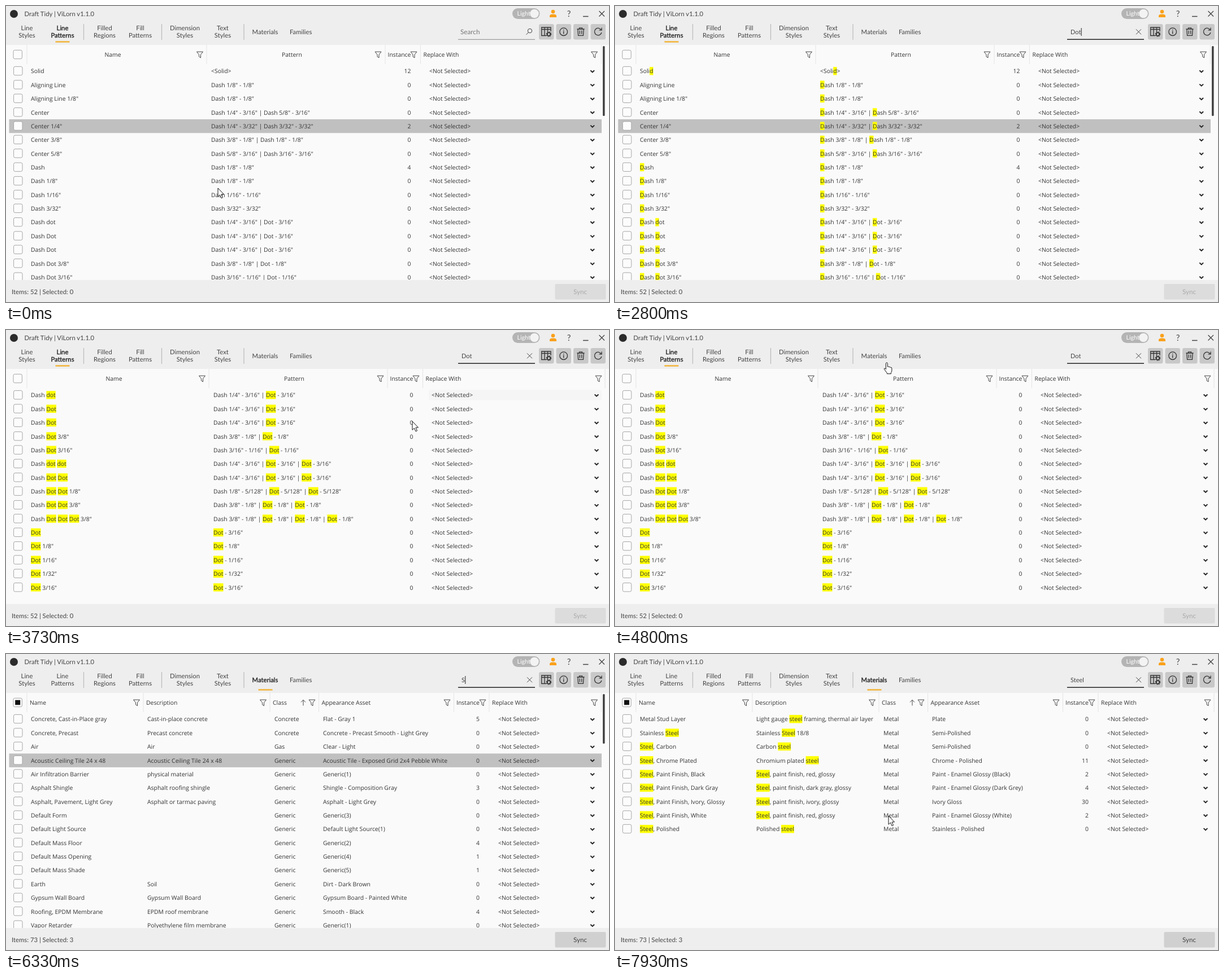
An HTML page for the animation above (8 s loop, 1067 by 525 pixels).

```html
<!DOCTYPE html>
<html lang="en">
<head>
<meta charset="utf-8">
<title>Table search</title>
<style>
  html, body { margin: 0; width: 100%; height: 100%; overflow: hidden; background: #fafafa; }
  svg { display: block; text-rendering: geometricPrecision; }
  text { fill: #333; font: 10.4px "Open Sans", "Noto Sans", sans-serif; }
  .ui text { fill: #444; font: 11.3px Lato, sans-serif; }
  .ui .on { fill: #1c1c1c; stroke: #1c1c1c; stroke-width: .3; }
  .ui .mid, .mid { text-anchor: middle; }
  .end { text-anchor: end; }
  .line { fill: none; stroke: #444; }
</style>
</head>
<body>
<svg id="stage" width="1067" height="525" viewBox="0 0 1067 525">
  <rect width="1067" height="525" fill="#fafafa"/>
  <g id="pages"></g>
  <g class="ui">
    <rect width="1067" height="69" fill="#eee"/>
    <rect y="486" width="1067" height="39" fill="#eee"/>
    <circle cx="14" cy="14" r="7" fill="#2b2b2b"/>
    <text x="32.5" y="17.5">Draft Tidy | ViLorn v1.1.0</text>

    <rect x="896" y="4" width="48.5" height="19" rx="9.5" fill="#b4b4b4"/>
    <text x="904.5" y="17.2" style="fill:#fff;font-size:10.7px">Light</text>
    <circle cx="935" cy="13.5" r="7.8" fill="#f3f3f3"/>
    <circle cx="968" cy="10" r="3.3" fill="#f9a11b"/>
    <path d="M962 20v-2.2q0-3.300 6-3.300t6 3.300V20z" fill="#f9a11b"/>
    <text class="mid" x="996" y="18.500" style="font-size:15px">?</text>
    <path class="line" stroke-width="1.300" d="M1021 18.500h9.500M1049.500 9l9.500 9.500m0-9.500l-9.500 9.500"/>

    <path d="M137.500 32v28M275.500 32v28M421 32v28" stroke="#bdbdbd" stroke-width="1.300"/>
    <g id="tabs"></g>
    <rect id="mark" y="62.300" width="25" height="2.400" fill="#f2b233"/>

    <text id="hint" x="804" y="50" style="font-size:11.700px;fill:#777">Search</text>
    <text id="typed" x="806" y="50" style="font-size:11px"></text>
    <rect id="caret" y="39" width="1" height="14" fill="#222"/>
    <path id="under" d="M800 59.300h136"/>
    <path id="lens" class="line" d="M924.500 46.800l-4 4M930.700 44a3.700 3.700 0 1 1-7.400 0a3.700 3.700 0 1 1 7.400 0z"/>
    <path id="clear" class="line" d="M922 41.300l9 9m0-9l-9 9"/>

    <g fill="#c8c8c8">
      <rect x="943" y="32" width="26.500" height="27.500" rx="3"/>
      <rect x="973.500" y="32" width="26.500" height="27.500" rx="3"/>
      <rect x="1004" y="32" width="26.500" height="27.500" rx="3"/>
      <rect x="1034.500" y="32" width="26.500" height="27.500" rx="3"/>
    </g>
    <g class="line" stroke-width="1.300" style="stroke:#333">
      <path d="M956 52.500h-8.300v-14.500h16.300v7M947.700 41.500h16.300M953 38v14.500M958.500 38v8"/>
      <circle cx="960.500" cy="50" r="2.800" stroke-width="1.800"/>
      <circle cx="960.500" cy="50" r="4.200" stroke-dasharray="1.650 1.650"/>
      <circle cx="986.700" cy="45.700" r="6.800"/>
      <path d="M986.700 44.500v5M986.700 41.800v1.400"/>
      <path d="M1010.500 41h13M1014.500 41v-2.200h5V41M1011.800 41l.8 11.300h8.800l.8-11.300M1015.300 43.500v6.300M1018.700 43.500v6.300"/>
      <path d="M1053.300 42.500a6.300 6.300 0 1 0 .6 4.500M1054 38.500v4.400h-4.400"/>
    </g>

    <text id="status" x="10" y="510.500"></text>
    <rect id="sync" x="971.500" y="493" width="90" height="27.500" rx="2"/>
    <text id="syncText" class="mid" x="1016" y="510.700" style="font-size:11.600px">Sync</text>
  </g>
  <g id="pointer" stroke="#111" fill="#fff" stroke-linejoin="round">
    <path id="arrow" d="M0 0V15.300L3.500 12 6 17.800 8.500 16.700 6 11H10.500Z"/>
    <path id="beam" fill="none" stroke-width="1.200" d="M-3-7h2q1 0 1 1V6q0 1-1 1h-2M3-7h-2q-1 0-1 1M3 7h-2q-1 0-1-1"/>
    <path id="hand" d="M-1.500 1.300a1.500 1.500 0 0 1 3 0V7q1.400-1 2.600.5q1.400-.8 2.400.6q2.500-.4 2.500 2V14q0 2-1.500 3.500V19.500H.5V18L-4.500 11.500q-.3-2.200 1.500-1.500L-1.500 11.500Z"/>
  </g>
</svg>
<script>
const $ = id => document.getElementById(id);
const LOOP = 8000, RATE = 15, TOP = 115.5, PITCH = 24.37;

function el(tag, attrs, parent, text) {
  const node = document.createElementNS('http://www.w3.org/2000/svg', tag);
  for (const k in attrs) node.setAttribute(k, attrs[k]);
  if (text !== undefined) node.textContent = text;
  parent.appendChild(node);
  return node;
}

// name; pattern; instances (0 when left out)
const lines = `Solid;<Solid>;12
Aligning Line;Dash 1/8 - 1/8
Aligning Line 1/8;Dash 1/8 - 1/8
Center;Dash 1/4 - 3/16 | Dash 5/8 - 3/16
Center 1/4;Dash 1/4 - 3/32 | Dash 3/32 - 3/32;2
Center 3/8;Dash 3/8 - 1/8 | Dash 1/8 - 1/8
Center 5/8;Dash 5/8 - 3/16 | Dash 3/16 - 3/16
Dash;Dash 1/8 - 1/8;4
Dash 1/8;Dash 1/8 - 1/8
Dash 1/16;Dash 1/16 - 1/16
Dash 3/32;Dash 3/32 - 3/32
Dash dot;Dash 1/4 - 3/16 | Dot - 3/16
Dash Dot;Dash 1/4 - 3/16 | Dot - 3/16
Dash Dot;Dash 1/4 - 3/16 | Dot - 3/16
Dash Dot 3/8;Dash 3/8 - 1/8 | Dot - 1/8
Dash Dot 3/16;Dash 3/16 - 1/16 | Dot - 1/16
Dash dot dot;Dash 1/4 - 3/16 | Dot - 3/16 | Dot - 3/16
Dash Dot Dot;Dash 1/4 - 3/16 | Dot - 3/16 | Dot - 3/16
Dash Dot Dot 1/8;Dash 1/8 - 5/128 | Dot - 5/128 | Dot - 5/128
Dash Dot Dot 3/8;Dash 3/8 - 1/8 | Dot - 1/8 | Dot - 1/8
Dash Dot Dot Dot 3/8;Dash 3/8 - 1/8 | Dot - 1/8 | Dot - 1/8 | Dot - 1/8
Dot;Dot - 3/16
Dot 1/8;Dot - 1/8
Dot 1/16;Dot - 1/16
Dot 1/32;Dot - 1/32
Dot 3/16;Dot - 3/16`.replace(/\d+\/\d+/g, '$&"').split('\n').map(r => r.split(';'));

// name; description; class; asset; instances
const materials = `Concrete, Cast-in-Place gray;Cast-in-place concrete;Concrete;Flat - Gray 1;5
Concrete, Precast;Precast concrete;Concrete;Concrete - Precast Smooth - Light Grey
Air;Air;Gas;Clear - Light
Acoustic Ceiling Tile 24 x 48;Acoustic Ceiling Tile 24 x 48;Generic;Acoustic Tile - Exposed Grid 2x4 Pebble White
Air Infiltration Barrier;physical material;Generic;Generic(1)
Asphalt Shingle;Asphalt roofing shingle;Generic;Shingle - Composition Gray;3
Asphalt, Pavement, Light Grey;Asphalt or tarmac paving;Generic;Asphalt - Light Grey
Default Form;;Generic;Generic(3)
Default Light Source;;Generic;Default Light Source(1)
Default Mass Floor;;Generic;Generic(2);4
Default Mass Opening;;Generic;Generic(4);1
Default Mass Shade;;Generic;Generic(5);1
Earth;Soil;Generic;Dirt - Dark Brown
Gypsum Wall Board;Gypsum Wall Board;Generic;Gypsum Board - Painted White
Roofing, EPDM Membrane;EPDM roof membrane;Generic;Smooth - Black;4
Vapor Retarder;Polyethylene film membrane;Generic;Generic(1)
Metal Stud Layer;Light gauge steel framing, thermal air layer;Metal;Plate
Stainless Steel;Stainless Steel 18/8;Metal;Semi-Polished
Steel, Carbon;Carbon steel;Metal;Semi-Polished
Steel, Chrome Plated;Chromium plated steel;Metal;Chrome - Polished;11
Steel, Paint Finish, Black;Steel, paint finish, red, glossy;Metal;Paint - Enamel Glossy (Black);2
Steel, Paint Finish, Dark Gray;Steel, paint finish, dark gray, glossy;Metal;Paint - Enamel Glossy (Dark Grey);4
Steel, Paint Finish, Ivory, Glossy;Steel, paint finish, ivory, glossy;Metal;Ivory Gloss;30
Steel, Paint Finish, White;Steel, paint finish, red, glossy;Metal;Paint - Enamel Glossy (White);2
Steel, Polished;Polished steel;Metal;Stainless - Polished`.split('\n').map(r => r.split(';'));

// column: left edge, title, title x, funnel x, cell x, centred title
const lineCols = s => [
  [37, 'Name', 189 + s / 2, 343 + s, 44, true],
  [355 + s, 'Pattern', 506 + s, 658.5 + s, 363 + s, true],
  [671 + s, 'Instance', 675.5 + s, 721.5 + s, 716.5 + s],
  [733.5 + s, 'Replace With', 738.5 + s, s ? 1048.5 : 1041, 749 + s]
];
const materialCols = s => [
  [37, 'Name', 42, 231, 44],
  [243, 'Description', 248, 455, 250],
  [467, 'Class', 472, 541.5, 475],
  [553.5, 'Appearance Asset', 558.5, 780.5, 561],
  [792.5, 'Instance', 797, 843.5, 838],
  [855, 'Replace With', 860, s ? 1048.5 : 1041, 871]
];

function checkBox(g, x, y) {
  el('rect', { x: x - 7.7, y: y - 7.7, width: 15.4, height: 15.4, rx: 2.5, fill: '#fcfcfc', stroke: '#a6a6a6' }, g);
}

function cell(g, x, y, text, query) {
  const node = el('text', { x, y: y + 3.9 }, g, text);
  if (!query) return;
  for (const m of text.matchAll(new RegExp(query, 'gi'))) {
    const a = node.getStartPositionOfChar(m.index).x;
    const b = node.getEndPositionOfChar(m.index + m[0].length - 1).x;
    const mark = el('rect', { x: a, y: y - 7.4, width: b - a, height: 14.4, fill: '#ff0' }, g);
    g.insertBefore(mark, node);
  }
}

function page({ cols, rows, query, picked = -1, bar = 0, some }) {
  const g = el('g', {}, $('pages'));
  const n = cols.length, right = bar ? 1053.5 : 1060;
  checkBox(g, 20.7, 86);
  if (some) el('rect', { x: 16.2, y: 81.7, width: 9, height: 8.6, fill: '#111' }, g);
  cols.forEach(([left, title, x, funnel, , centred]) => {
    el('path', { d: `M${left} 69v34`, stroke: '#e4e4e4' }, g);
    el('text', { x, y: 89.9, class: centred ? 'mid' : '' }, g, title);
    el('path', { class: 'line', d: `M${funnel - 5.5} 81.2h11l-4 5v5.600l-3-2v-3.600z` }, g);
    if (title === 'Class') el('path', { class: 'line', d: 'M526 91.500v-10m-4 4l4-4l4 4' }, g);
  });
  el('path', { d: `M${right} 69v34`, stroke: '#e4e4e4' }, g);
  if (bar) el('rect', { x: 1056, y: 71, width: 3.6, height: bar, rx: 1.5, fill: '#444' }, g);

  rows.forEach((row, i) => {
    const y = TOP + i * PITCH;
    if (i === picked) el('rect', { x: 5.5, y: y - 12.1, width: 1048.5, height: 24.4, fill: '#c0c0c0' }, g);
    checkBox(g, 21.3, y - .4);
    cols.forEach((c, k) => {
      if (k < n - 2) cell(g, c[4], y, row[k], query);
    });
    el('text', { x: cols[n - 2][4], y: y + 3.9, class: 'end' }, g, row[n - 2] || '0');
    cell(g, cols[n - 1][4], y, '<Not Selected>');
    el('path', { d: `M${bar ? 1034.3 : 1041.6} ${y - 1.3}l3.400 3.200l3.400-3.200`, fill: 'none', stroke: '#222', 'stroke-width': 1.9 }, g);
  });
  return g;
}

const has = word => row => row.join(' ').toLowerCase().includes(word);
const allLines = { cols: lineCols(0), rows: lines.slice(0, 16), picked: 4, bar: 124 };
const allMaterials = { cols: materialCols(0), rows: materials.slice(0, 16), picked: 3, bar: 88, some: true };

// start tick and content of each table state
const pages = [
  [0, allLines],
  [38, { ...allLines, query: 'd' }],
  [47, { cols: lineCols(4), rows: lines.filter(has('dot')), query: 'dot' }],
  [76, allMaterials],
  [102, { ...allMaterials, query: 's' }],
  [113, { cols: materialCols(1), rows: materials.filter(has('steel')), query: 'steel', some: true }]
].map(([at, spec]) => [at, page(spec)]);

const hover = el('rect', { x: 748, y: 106.5, width: 306, height: 18, rx: 2, fill: '#f5f5f5' }, $('pages'));
pages[2][1].prepend(hover);

const tabs = [['Line', 'Styles', 37], ['Line', 'Patterns', 100], ['Filled', 'Regions', 174.5], ['Fill', 'Patterns', 237.5],
  ['Dimension', 'Styles', 316.5], ['Text', 'Styles', 383.5], ['Materials', '', 458.5], ['Families', '', 521.7]
].map(([a, b, x]) => {
  const g = el('g', {}, $('tabs'));
  el('text', { x, y: b ? 43.2 : 49.8, class: 'mid' }, g, a);
  if (b) el('text', { x, y: 55.8, class: 'mid' }, g, b);
  return g;
});

// [tick, value] lists; the last entry reached counts
const typing = [[0, ''], [33, 'D'], [39, 'Do'], [42, 'Dot'], [76, ''], [95, 'S'], [102, 'St'], [104, 'Ste'], [106, 'Stee'], [108, 'Steel']];
const shapes = [[0, 'arrow'], [7, 'beam'], [32, ''], [52, 'beam'], [53, 'arrow'], [72, 'hand'], [79, 'arrow'], [85, 'beam'], [95, ''], [118, 'arrow']];
const blinks = [[0, 0], [15, 1], [23, 0], [31, 1], [50, 0], [58, 1], [66, 0], [74, 1], [76, 0], [88, 1], [116, 0]];
const path = [[0, 375, 323], [5, 862, 72], [6, 862, 72], [8, 854, 48], [9, 854, 48], [10, 852, 48],
  [51, 852, 48], [54, 782, 108], [56, 719, 162], [60, 644, 363], [64, 531, 151], [69, 488, 64], [71, 488, 64],
  [74, 466.500, 46.500], [77, 466.500, 46.500], [82, 640, 76], [86, 845, 53.500],
  [117, 845, 53.500], [118, 645, 263], [119, 484, 287], [120, 484, 287]];

const at = (list, n) => list.filter(k => k[0] <= n).pop()[1];

function along(n) {
  const i = Math.max(1, path.findIndex(k => k[0] >= n));
  const [a, x, y] = path[i - 1], [b, u, v] = path[i];
  const p = (n - a) / (b - a);
  return [x + (u - x) * p, y + (v - y) * p];
}

const show = (node, on) => { node.style.display = on ? '' : 'none'; };

function draw(ms) {
  const n = Math.floor(ms / 1000 * RATE + .06) % 120;
  const late = n >= 76;
  const focus = (n >= 15 && !late) || n >= 88;
  const text = at(typing, n), shape = at(shapes, n), current = at(pages, n);

  pages.forEach(p => show(p[1], p[1] === current));
  show(hover, n >= 54 && n < 59);

  tabs.forEach((g, i) => {
    const on = late ? i === 6 && n > 76 : i === 1;
    for (const t of g.children) t.classList.toggle('on', on);
  });
  $('mark').setAttribute('x', late ? 446.5 : 87.5);

  show($('hint'), !focus);
  $('typed').textContent = text;
  $('caret').setAttribute('x', 806 + (text ? $('typed').getComputedTextLength() + .3 : 0));
  show($('caret'), at(blinks, n));
  $('under').setAttribute('stroke', focus ? '#222' : '#888');
  $('under').setAttribute('stroke-width', focus ? 1.4 : 1);
  show($('lens'), !text);
  show($('clear'), text);

  $('status').textContent = late ? 'Items: 73 | Selected: 3' : 'Items: 52 | Selected: 0';
  $('sync').setAttribute('fill', late ? '#d0d0d0' : '#dcdcdc');
  $('syncText').style.fill = late ? '#444' : '#aaa';

  for (const id of ['arrow', 'beam', 'hand']) show($(id), id === shape);
  $('pointer').setAttribute('transform', `translate(${along(n)})`);
}

const start = performance.now();
function tick() {
  draw((performance.now() - start) % LOOP);
  requestAnimationFrame(tick);
}
tick();
</script>
</body>
</html>
```
